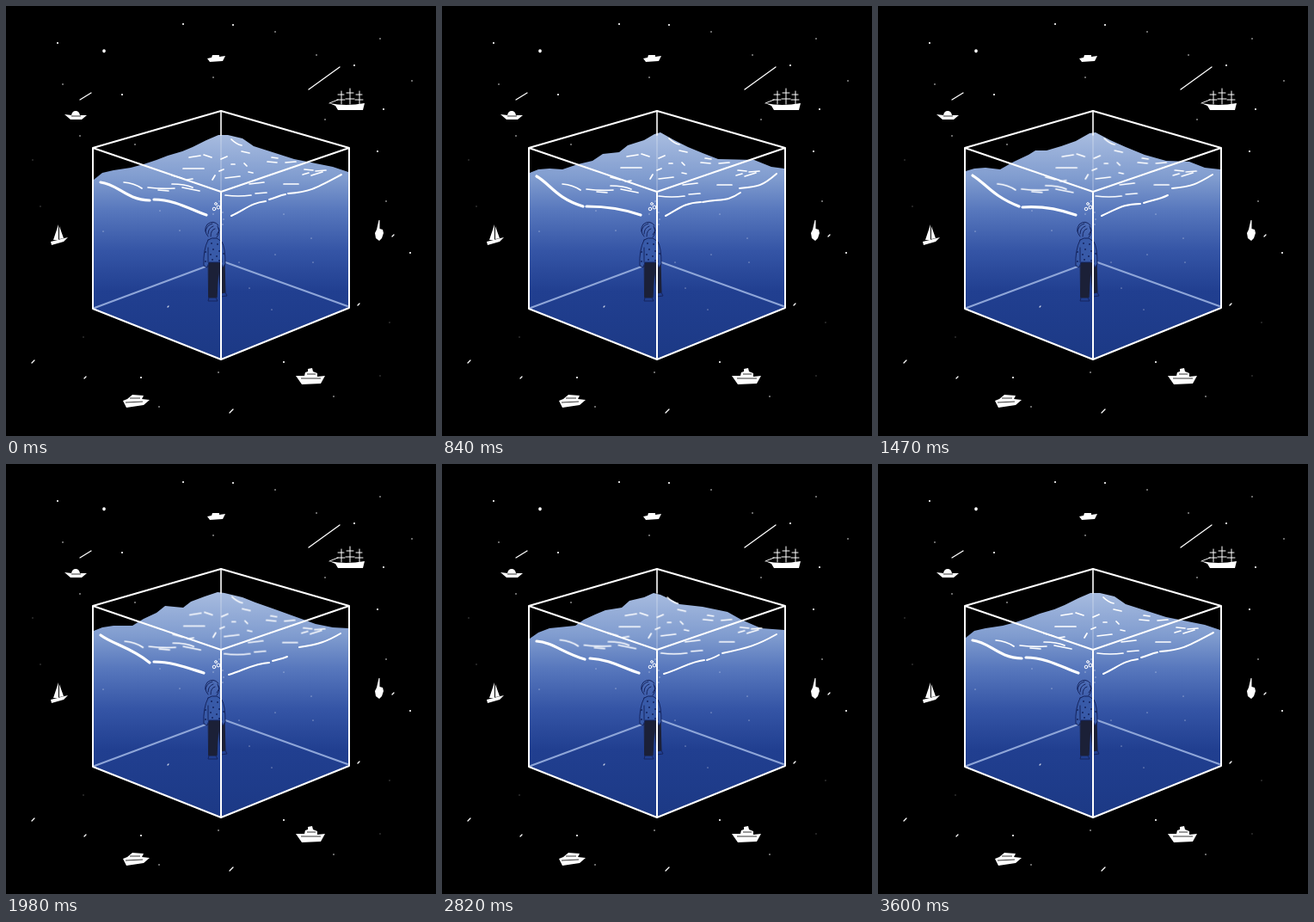
Animation, 500 px wide and 500 px high, one loop 3.63 s. Source, as an HTML page without scripts:

```html
<!DOCTYPE html>
<html lang="en">
<head>
<meta charset="utf-8">
<title>Sea in a box</title>
<style>
  html, body { margin: 0; width: 100%; height: 100%; overflow: hidden; background: #000; }
  svg { display: block; width: 100vw; height: 100vh; }
  .line { fill: none; stroke: #fff; stroke-linecap: round; stroke-linejoin: round; }
  .water, .foam-left, .foam-right, .ripples { animation: 3630ms linear infinite; }

  .water { animation-name: swell; }
  @keyframes swell {
    0%, 99.2%, 100% { d: path("M101 352L102 202L112 194L125 191L145 188L160 184L175 179L188 174L205 169L217 164L233 156L247 150L258 150L275 154L288 163L310 170L335 178L360 183L380 187L398 193L399 351L250 411Z"); }
    23.1% { d: path("M101 352L102 194L112 190L125 189L140 190L158 184L175 180L187 172L206 170L216 162L235 156L247 149L254 147L270 156L286 164L303 171L321 178L363 179L383 187L398 189L399 351L250 411Z"); }
    40.5% { d: path("M101 352L102 192L112 189L125 188L142 190L158 181L175 173L183 168L196 168L213 163L230 157L246 148L253 147L270 156L288 164L310 173L335 180L362 181L380 188L398 190L399 351L250 411Z"); }
    54.5% { d: path("M101 352L102 194L112 190L125 188L147 188L160 180L175 173L185 165L206 167L215 160L231 154L246 149L254 150L275 155L290 161L310 168L335 177L360 186L380 190L398 191L399 351L250 411Z"); }
    65.3% { d: path("M101 352L102 199L112 192L125 189L147 188L160 183L175 174L190 167L208 166L217 158L233 155L246 149L254 151L271 158L290 162L310 166L335 173L356 184L376 191L398 191L399 351L250 411Z"); }
    77.7% { d: path("M101 352L102 203L112 196L125 191L155 188L165 181L178 175L190 170L209 167L218 159L235 155L246 150L254 152L269 159L276 163L303 166L332 172L348 181L371 191L398 193L399 351L250 411Z"); }
  }

  .foam-left { animation-name: left-crest; }
  @keyframes left-crest {
    0%, 99.2%, 100% { d: path("M110 205C130 207 139 225 167 226M172 225C197 225 217 238 233 243"); }
    23.1% { d: path("M110 198C126 207 132 223 164 233M168 233C194 233 214 237 231 243"); }
    40.5% { d: path("M110 197C125 206 133 221 164 233M168 234C194 232 213 237 230 243"); }
    54.5% { d: path("M110 199C125 210 145 213 167 231M172 230C193 230 211 237 230 243"); }
    65.3% { d: path("M110 203C126 209 145 213 167 229M172 229C194 229 210 237 229 243"); }
    77.7% { d: path("M110 206C128 207 143 221 166 227M172 226C195 227 212 238 229 243"); }
  }

  .foam-right { animation-name: right-crest; }
  @keyframes right-crest {
    0%, 99.2%, 100% { d: path("M262 244C279 236 285 229 302 227M306 225C314 223 318 220 325 219M328 218C354 216 360 212 390 196"); }
    23.1% { d: path("M260 244C275 236 281 229 301 228M303 228C325 224 331 228 347 217M346 212C367 210 372 210 389 195"); }
    40.5% { d: path("M260 244C278 236 285 230 305 230M309 229C318 226 327 225 337 220M342 212C365 210 371 207 389 196"); }
    54.5% { d: path("M259 245C278 239 289 232 306 231M310 229C316 227 320 227 327 224M341 213C363 210 374 206 389 197"); }
    65.3% { d: path("M258 245C278 238 289 232 306 230M310 229C316 226 319 226 325 223M340 214C363 211 374 206 389 198"); }
    77.7% { d: path("M258 244C278 238 288 230 305 228M308 228C314 226 317 225 322 222M326 220C355 214 366 211 389 198"); }
  }

  .ripples { animation-name: drift; }
  @keyframes drift {
    0%, 99.2%, 100% { transform: none; }
    23.1% { transform: translate(var(--x), var(--y)); }
    40.5% { transform: translate(calc(var(--x) * .6), calc(var(--y) * .9)); }
    54.5% { transform: translate(calc(var(--x) * .4), calc(var(--y) * .6)); }
    77.7% { transform: translate(calc(var(--x) * .1), calc(var(--y) * -.2)); }
  }
</style>
</head>
<body>
<svg viewBox="0 0 500 500">
  <defs>
    <linearGradient id="depth" gradientUnits="userSpaceOnUse" x1="0" y1="147" x2="0" y2="411">
      <stop offset="0" stop-color="#a9bde0"/>
      <stop offset=".2" stop-color="#809ccf"/>
      <stop offset=".34" stop-color="#5878bd"/>
      <stop offset=".52" stop-color="#3555a6"/>
      <stop offset=".7" stop-color="#213f90"/>
      <stop offset="1" stop-color="#1c3985"/>
    </linearGradient>
  </defs>
  <rect width="500" height="500"/>

  <g class="line">
    <path stroke-width="1.5" d="M241 83h0M66 91h0M361 57h0M313 30h0M435 38h0M472 87h0M371 132h0M86 151h0M150 161h0M247 426h0M381 454h0M178 466h0M442 227h0"/>
    <path stroke-width="1" stroke="#aaa" d="M31 179h0M40 233h0M446 368h0M90 385h0M435 430h0"/>
    <path stroke-width="2.2" d="M206 21h0M264 22h0M60 43h0M405 69h0M135 103h0M439 120h0M432 169h0M470 287h0M157 432h0M323 414h0"/>
    <path stroke-width="3.6" d="M114 52v.6"/>
    <path stroke-width="1.3" d="M352 97L388 71M86 109L99 101M449 268l2-2M409 348l2-2M30 415l3-3M91 433l2-2M260 473l4-4"/>
  </g>

  <g id="boats" fill="#fff">
    <path d="M234 61L239 60L240 57H248V59L255 58L252 64L237 65Z"/>
    <path d="M68 126L76 127Q77 122 81 122T86 127L94 127L88 132H75Z"/>
    <path d="M376 113Q395 117 417 113L415 121H386L383 116Z"/>
    <path class="line" stroke-width="1" d="M390 99V114M400 96V114M411 99V114M386 103h7M385 109h9M396 101h8M395 108h10M407 103h7M406 109h9M376 113l10-4"/>
    <path d="M61 254L55 272L61 272ZM62 256V271L67 270ZM52 274L72 269L67 274L53 278Z"/>
    <path d="M433.500 249h1V259L438 260L439 264L437 270L434 273L430 270L429 264L431 260Z"/>
    <path d="M337 430L347 430L348 426L351 425V422L356 421L357 425L362 427V431L371 430L366 439L344 440Z"/>
    <path d="M136 459L141 457L147 452L160 453L158 457L167 458L160 464L140 467Z"/>
    <path fill="none" stroke="#000" stroke-width=".8" d="M343 433H366M350 428h10M144 456h12M139 461l20-1M76 128h11"/>
  </g>

  <path class="water" fill="url(#depth)" d="M101 352L102 202L247 150L398 193L399 351L250 411Z"/>

  <g class="line">
    <path stroke="#8fa6d8" stroke-width="2" d="M103 351L232 303M255 298L397 349"/>
    <path stroke-width="1.200" opacity=".8" d="M179 238h0M202 261h0M113 262h0M323 242h0M355 270h0M313 289h0M357 298h0M271 298h0M283 328h0M188 350l1-1M309 353h0"/>
  </g>

  <g id="person" stroke="#15245e" stroke-width="1" fill="none" stroke-linecap="round" stroke-linejoin="round">
    <path fill="#1b2037" stroke="#1b2037" d="M235.500 298L254 297L255 333L250 334L247 304L245 339H236Z"/>
    <path fill="#385aa8" d="M235 272Q239 269 245 270L251 274Q255 281 255 300L252 304L250 298H236L234 304L230 302Q229 284 235 272Z"/>
    <path d="M235 281L235 298M250 280L251 298M245 269Q249 265 247 258"/>
    <path d="M235 268Q229 261 234 254Q241 248 247 255M232 262Q233 255 240 253M235 265Q235 258 241 256M238 268Q238 260 243 259M246 256L248 261L245 266"/>
    <path d="M236 339L235 343H246L244 339M250 334L250 338L257 337L255 333"/>
    <path stroke-width="2" d="M239 276h0M246 277h0M241 283h0M248 285h0M238 289h0M245 291h0M240 295h0M248 296h0M232 286h0M253 288h0M232 297h0"/>
  </g>

  <g class="line" stroke-width="1">
    <circle cx="242" cy="236" r="1.800"/>
    <circle cx="247" cy="234" r="2"/>
    <circle cx="244" cy="230" r="1.400"/>
    <path d="M248 227h0M241 242h0M252 240h0M253 248h0M252 254h0"/>
  </g>

  <g class="line" stroke-width="1.700">
    <path class="ripples" style="--x:3px;--y:2px" d="M137 205Q149 206 158 212M165 211Q181 213 196 212M177 214L189 215M193 207Q208 207 217 211M205 211L225 215M193 197L204 200M210 202L217 201"/>
    <path class="ripples" style="--x:2px;--y:-1px" d="M262 155Q268 161 274 162M213 176L226 174M230 173L239 176M250 178L257 175M274 169L283 171M262 184h4M277 183l3 3M206 189L230 189M243 197L240 202M248 192l5-2"/>
    <path class="ripples" style="--x:-3px;--y:1px" d="M309 176L316 177M304 181L315 182M325 182L337 181M347 190L357 191M360 192L372 191M345 196L352 194M355 197L368 193M255 200L272 198M283 207L300 205M323 207L340 207M255 220Q270 222 285 220M290 218L303 217M282 193l5 1"/>
    <path class="foam-left" stroke-width="3.200" d="M110 205C130 207 139 225 167 226M172 225C197 225 217 238 233 243"/>
    <path class="foam-right" stroke-width="2" d="M262 244C279 236 285 229 302 227M306 225C314 223 318 220 325 219M328 218C354 216 360 212 390 196"/>
  </g>

  <g id="box" class="line" stroke-width="2">
    <path stroke-width="1.600" d="M250 122V150"/>
    <path stroke-width="1.200" opacity=".35" d="M250 150V215"/>
    <path d="M101 165L250 122L399 165V351L250 411L101 352ZL250 216L399 165M250 216V411"/>
  </g>
</svg>
</body>
</html>
```
